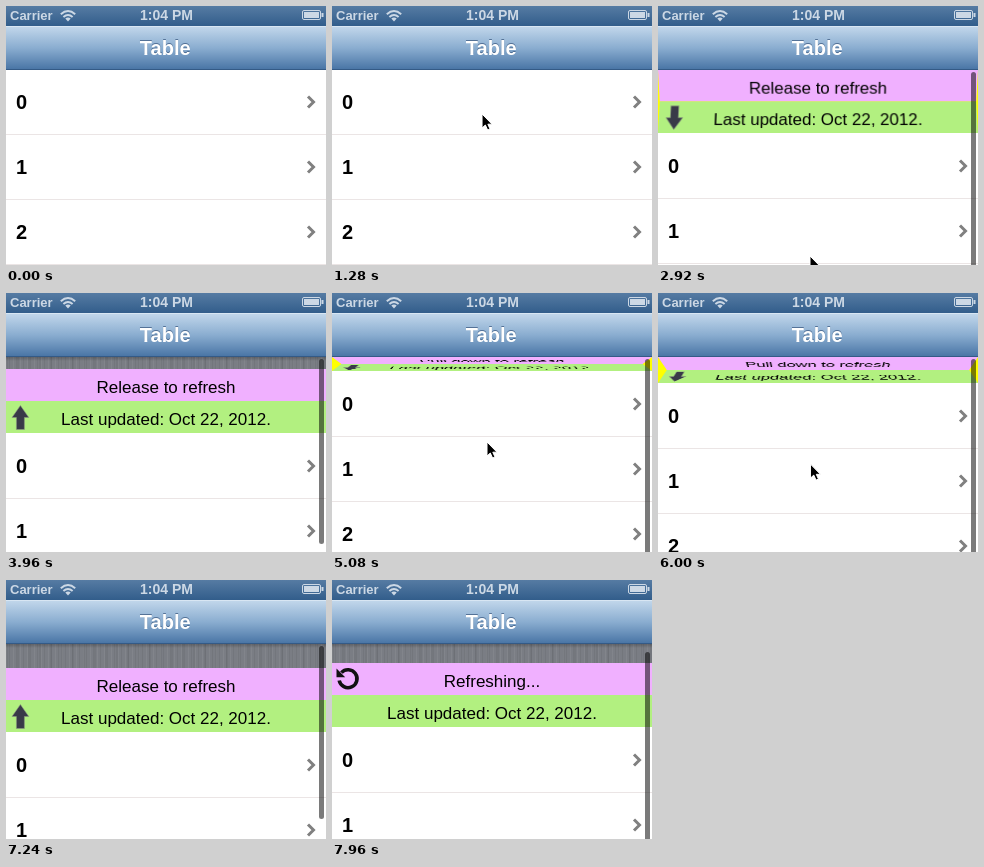
Animation of 320 by 259 pixels, one loop 8000 ms. Source, as an HTML page:

```html
<!DOCTYPE html>
<html lang="en">
<head>
<meta charset="utf-8">
<title>Pull to refresh</title>
<style>
html, body { margin: 0; width: 100%; height: 100%; overflow: hidden; }
body { position: relative; background: #fff; font-family: "Liberation Sans", Arial, sans-serif; }
#stage { position: absolute; left: 0; top: 0; width: 320px; height: 259px; overflow: hidden; background: #fff; }
#stage svg { position: absolute; left: 0; top: 0; overflow: visible; }
#linen {
  position: absolute; left: 0; top: 64px; width: 320px;
  background:
    linear-gradient(rgba(0,0,0,.22), transparent 4px),
    repeating-linear-gradient(90deg, rgba(255,255,255,.06) 0 1px, transparent 1px 3px, rgba(0,0,0,.06) 3px 4px, transparent 4px 7px),
    repeating-linear-gradient(90deg, rgba(0,0,0,.05) 0 2px, transparent 2px 11px),
    #7a7d84;
}
#fold { position: absolute; left: 0; width: 320px; overflow: hidden; background: #ff0; perspective: 500px; }
.flap { position: absolute; left: 0; width: 320px; height: 32px; box-sizing: border-box; padding-top: 3px;
  font-size: 17px; line-height: 32px; text-align: center; color: #000; }
#upper { top: 0; transform-origin: 50% 0; background: #f0b0ff; }
#lower { bottom: 0; transform-origin: 50% 100%; background: #b2f080; }
</style>
</head>
<body>
<div id="stage">
  <svg width="320" height="259"><g id="rows"></g></svg>
  <div id="linen"></div>
  <div id="fold">
    <div class="flap" id="upper"><span id="label"></span>
      <svg width="32" height="32"><g id="spinner">
        <path d="M9.4 9.6A9 9 0 1 1 7.2 17.5" fill="none" stroke="#111" stroke-width="3.6"/>
        <path d="M4.5 5.5V14.2H13.2Z" fill="#111"/>
      </g></svg>
    </div>
    <div class="flap" id="lower">Last updated: Oct 22, 2012.
      <svg width="32" height="32"><g id="arrow">
        <path d="M11.6 4.5H19.6V16.5H24L15.6 28.5L7.2 16.5H11.6Z" fill="#393a48" stroke="#8d9a83" stroke-width=".6"/>
      </g></svg>
    </div>
  </div>
  <svg width="320" height="259" font-weight="bold">
    <defs>
      <linearGradient id="status" x2="0" y2="1">
        <stop stop-color="#567ba3"/><stop offset="1" stop-color="#325d8b"/>
      </linearGradient>
      <linearGradient id="nav" x2="0" y2="1">
        <stop stop-color="#c3d8ec"/><stop offset=".5" stop-color="#8aadd0"/><stop offset="1" stop-color="#4773a4"/>
      </linearGradient>
    </defs>
    <rect id="bar" x="313" width="5" rx="2.5" fill="#000" fill-opacity=".52"/>
    <rect width="320" height="20" fill="url(#status)"/>
    <rect y="20" width="320" height="44" fill="url(#nav)"/>
    <rect y="20" width="320" height="1" fill="#d8e6f3"/>
    <rect y="63" width="320" height="1" fill="#345a86"/>
    <g fill="#ccd8e5">
      <text x="4" y="14" font-size="13">Carrier</text>
      <text x="160.5" y="14" font-size="14" text-anchor="middle">1:04 PM</text>
      <path d="M62 15.4L59.3 12.6Q62 10.6 64.7 12.6Z"/>
      <path d="M57.4 10.9Q62 7 66.6 10.9M54.8 8.2Q62 1.9 69.2 8.2" fill="none" stroke="#ccd8e5" stroke-width="2"/>
      <rect x="296.5" y="4.5" width="18" height="9" rx="1.5" fill="none" stroke="#ccd8e5"/>
      <rect x="298" y="6" width="15" height="6"/>
      <rect x="315.5" y="7" width="2" height="4"/>
    </g>
    <g font-size="20" text-anchor="middle">
      <text x="159.2" y="48" fill="#34527a" fill-opacity=".7">Table</text>
      <text x="159.2" y="49" fill="#fff">Table</text>
    </g>
    <path id="cursor" d="M0 0V14L3.3 11L5.6 16L8 15L5.8 10.2H10Z" fill="#000" stroke="#fff" stroke-width="1"/>
  </svg>
</div>
<script>
const LOOP = 8000, FULL = 64;
const FLIPS = [2920, 4380, 6640], RELEASE = 7800;
const $ = id => document.getElementById(id);

const pull = [[0, 0], [1350, 0], [2000, 20], [2920, 64], [3500, 78], [3960, 77], [4380, 64],
  [5080, 15], [5320, 8], [5480, 8], [6640, 65], [7450, 92], [7800, 92], [7960, 84], [8000, 81]];
const pointerY = [[0, 275], [1150, 108], [1350, 108], [2000, 152], [2920, 250], [3500, 282], [3960, 280],
  [4380, 253], [5080, 149], [5320, 134], [5480, 134], [6640, 248], [7450, 310], [8000, 310]];
const pointerX = [[0, 190], [1150, 150], [2000, 151], [2920, 152], [5080, 155], [6640, 151], [8000, 151]];

const clamp = (v, a, b) => Math.min(b, Math.max(a, v));

// Monotone cubic through [time, value] points
function curve(p, t) {
  const grade = i => (p[i + 1][1] - p[i][1]) / (p[i + 1][0] - p[i][0]);
  const slope = i => {
    if (i === 0 || i === p.length - 1) return 0;
    const a = grade(i - 1), b = grade(i);
    return a * b > 0 ? 2 * a * b / (a + b) : 0;
  };
  let i = 0;
  while (i < p.length - 2 && t >= p[i + 1][0]) i++;
  const [t0, a] = p[i], [t1, b] = p[i + 1], d = t1 - t0;
  const u = clamp((t - t0) / d, 0, 1), v = 1 - u;
  return v * v * (1 + 2 * u) * a + u * u * (3 - 2 * u) * b
    + d * u * v * (v * slope(i) - u * slope(i + 1));
}

for (let i = 0; i < 3; i++) {
  const y = 64 + i * 65;
  $("rows").innerHTML += `<g transform="translate(0 ${y})">
    <text x="10" y="39" font-size="20" font-weight="bold">${i}</text>
    <path d="M302 26.5L307.5 32L302 37.5" fill="none" stroke="#808080" stroke-width="3"/>
    <rect y="64" width="320" height="1" fill="#ebe5e5"/></g>`;
}

function draw(t) {
  const h = curve(pull, t);
  const space = Math.max(0, Math.round(h) - 1); // header sits one pixel above the rows
  const open = Math.min(space, FULL), gap = space - open;
  const busy = t >= RELEASE;
  const armed = FLIPS.filter(f => t >= f).length % 2 === 1;

  $("rows").setAttribute("transform", `translate(0 ${Math.round(h)})`);
  $("linen").style.height = gap + "px";
  $("fold").style.top = 64 + gap + "px";
  $("fold").style.height = open + "px";

  const angle = Math.acos(open / FULL);
  $("upper").style.transform = `rotateX(${-angle}rad)`;
  $("lower").style.transform = `rotateX(${angle}rad)`;
  $("label").textContent = busy ? "Refreshing..." : armed ? "Release to refresh" : "Pull down to refresh";

  const turn = FLIPS.reduce((sum, f) => {
    const u = clamp((t - f) / 200, 0, 1);
    return sum + 180 * u * u * (3 - 2 * u);
  }, 0);
  $("arrow").setAttribute("transform", `rotate(${turn} 15 16.5)`);
  $("arrow").style.display = busy ? "none" : "";
  $("spinner").setAttribute("transform", `rotate(${(t - 7960) * 0.18} 16 15.5)`);
  $("spinner").style.display = busy ? "" : "none";

  const top = busy ? 72 : 66;
  $("bar").setAttribute("y", top);
  $("bar").setAttribute("height", (busy ? 392 : 328) - h - top);
  $("bar").style.opacity = clamp(h / 3, 0, 1);
  $("cursor").setAttribute("transform", `translate(${curve(pointerX, t)} ${curve(pointerY, t)})`);
}

const start = performance.now();
function tick() {
  const t = (performance.now() - start) % LOOP;
  draw(Math.floor(t / 40) * 40);
  requestAnimationFrame(tick);
}
tick();
</script>
</body>
</html>
```
